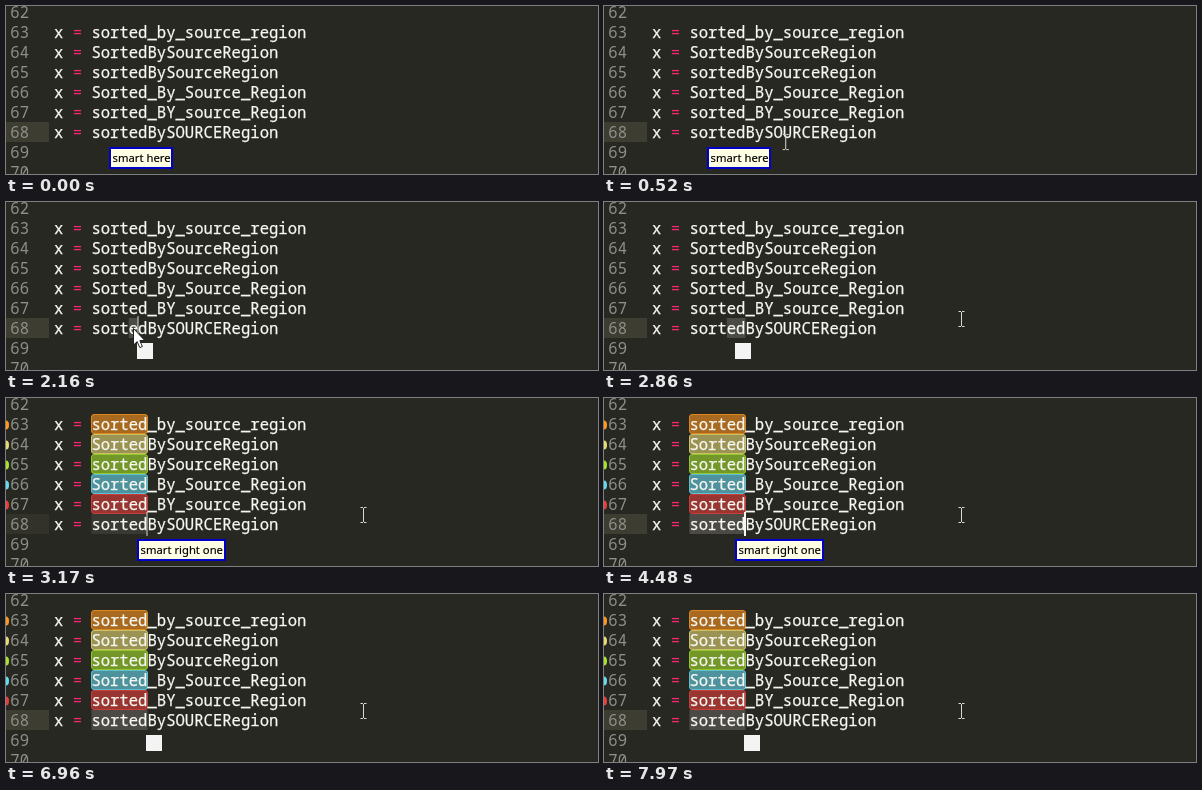
Recreate the animation shown at these times as an HTML page. Size 592 px wide and 168 px high, loop 8000 ms.

```html
<!DOCTYPE html>
<html lang="en">
<head>
<meta charset="utf-8">
<title>Editing by voice</title>
<style>
  html, body { margin: 0; width: 592px; height: 168px; overflow: hidden; background: #272822; }
  svg { display: block; }
  .code { font: 15.583px "Noto Sans Mono", "DejaVu Sans Mono", monospace; fill: #f8f8f2; stroke: #f8f8f2; stroke-width: .25; }
  .code .num { fill: #8f908a; stroke: none; }
  .code .op { fill: #f92672; stroke: none; }
  .tip { font: 11.25px "Noto Sans", "Open Sans", sans-serif; stroke: #000; stroke-width: .15; }
</style>
</head>
<body>
<svg id="stage" width="592" height="168" viewBox="0 0 592 168"></svg>
<script>
const LOOP = 8000, CHAR = 9.35, TEXT_X = 48, ROW = 20, LINE_Y = 116;

// Moments of the story, in ms
const cue = {
  enter: 70, press: 920, ready: 1150, follow: 1690, hush: 1850, leave: 2270,
  extend: 2700, speak: 3000, mark: 3170, settle: 3230, shift: 6880, done: 6960
};

const stage = document.getElementById('stage');

function add(parent, tag, attrs = {}, text = '') {
  const el = document.createElementNS('http://www.w3.org/2000/svg', tag);
  set(el, attrs);
  if (text) el.textContent = text;
  parent.appendChild(el);
  return el;
}
function set(el, attrs) {
  for (const k in attrs) el.setAttribute(k, attrs[k]);
}
const show = (el, on) => el.setAttribute('visibility', on ? 'visible' : 'hidden');
const within = (t, a, b) => t >= a && t < b;
const colX = col => TEXT_X + col * CHAR;
const caretX = col => Math.floor(colX(col)) - 1;

// Current line and selection
const gutter = add(stage, 'rect', { y: LINE_Y, width: 43, height: ROW, fill: '#3e3d32' });
const selection = add(stage, 'rect', { y: LINE_Y, height: ROW, fill: '#4b4a44' });

// Marked words
const marks = add(stage, 'g');
['#fd971f', '#e6db74', '#a6e22e', '#66d9ef', '#e5403c'].forEach((color, i) => {
  const y = 16.5 + i * ROW;
  add(marks, 'rect', {
    x: 85.5, y, width: 56, height: ROW - 1, rx: 2.5,
    fill: color, 'fill-opacity': .6, stroke: color, 'stroke-opacity': .8
  });
  add(marks, 'ellipse', { cx: 0, cy: y + 10.5, rx: 3, ry: 4.5, fill: color });
});

// Code
const names = ['sorted_by_source_region', 'SortedBySourceRegion', 'sortedBySourceRegion',
  'Sorted_By_Source_Region', 'sorted_BY_source_Region', 'sortedBySOURCERegion'];
const code = add(stage, 'g', { class: 'code' });
for (let i = 0; i < 9; i++) {
  const y = 12 + i * ROW, name = names[i - 1];
  add(code, 'text', { x: 4.3, y, class: 'num' }, String(62 + i));
  if (!name) continue;
  add(code, 'text', { x: colX(0), y }, 'x');
  add(code, 'text', { x: colX(2), y, class: 'op' }, '=');
  add(code, 'text', { x: colX(4), y }, name);
}
const caret = add(stage, 'rect', { y: LINE_Y - 2, width: 2, height: ROW + 4, fill: '#f8f8f0' });

// Speech tip and its idle badge
const tip = add(stage, 'g');
const tipBox = add(tip, 'rect', { x: 1, y: 142, height: 20, fill: '#ffffe6', stroke: '#0000c8', 'stroke-width': 2 });
const tipText = add(tip, 'text', { x: 3.6, y: 156, class: 'tip' });
const badge = add(stage, 'rect', { y: 141, width: 16, height: 16, fill: '#f4f4f4' });

// Pointers
const beam = add(stage, 'path', {
  d: 'M-3 -7.5H-.5M.5 -7.5H3M0 -7V7M-3 7.5H-.5M.5 7.5H3',
  fill: 'none', stroke: '#d8d8d4'
});
const ring = add(stage, 'circle', {
  cx: 127, cy: 127, r: 9.5, fill: 'none', stroke: '#3aa0d8', 'stroke-width': 4
});
const arrow = add(stage, 'path', {
  d: 'M127.5 126.5V143L131.2 139.6L133.8 145.6L136.4 144.5L133.8 138.6H138.8Z',
  fill: '#fff', stroke: '#111', 'stroke-width': .9
});

// Solid until the first fade, then a soft blink
function blink(t, first) {
  if (t < first) return 1;
  const p = (t - first) % 1010;
  return p < 570 ? Math.max(0, 1 - p / 150) : Math.min(1, (p - 570) / 150);
}

// Eased move between two points, sampled every 65 ms
function glide(t, start, length, from, to) {
  const k = Math.min(1, Math.floor((t - start) / 65) * 65 / length);
  const e = k * k * (3 - 2 * k);
  return from.map((v, i) => v + (to[i] - v) * e);
}

function drawEditor(t) {
  const col = t < cue.extend ? 9 : 10;
  const left = colX(t < cue.mark ? 8 : 4);
  const focus = within(t, cue.mark, cue.settle) ? .5 : 1;
  set(caret, {
    x: caretX(col),
    opacity: t < cue.press ? 0 : blink(t, t < cue.settle ? 1530 : 3740)
  });
  set(selection, { x: left, width: colX(col) - left, opacity: focus });
  show(selection, t >= cue.press);
  set(gutter, { opacity: focus });
  show(marks, t >= cue.mark);
}

function drawTip(t) {
  const text = t < cue.hush ? 'smart here' : within(t, cue.speak, cue.done) ? 'smart right one' : '';
  const x = caretX(t < cue.follow ? 6 : t < cue.shift ? 9 : 10);
  show(tip, text);
  show(badge, !text);
  set(badge, { x });
  set(tip, { transform: `translate(${x})` });
  set(tipBox, { width: 12 + 5 * text.length });
  tipText.textContent = text;
}

function drawPointer(t) {
  const [x, y] = t < cue.leave
    ? glide(t, cue.enter, 620, [297.5, 154], [129.5, 128])
    : glide(t, cue.leave, 190, [190.5, 128], [357.5, 117]);
  set(beam, { transform: `translate(${x} ${y})` });
  show(beam, within(t, cue.enter, cue.press) || t >= cue.leave);
  show(ring, within(t, cue.press, cue.ready));
  show(arrow, within(t, cue.ready, cue.leave));
}

const begun = performance.now();
function tick() {
  const t = (performance.now() - begun) % LOOP;
  drawEditor(t);
  drawTip(t);
  drawPointer(t);
  requestAnimationFrame(tick);
}
tick();
</script>
</body>
</html>
```
